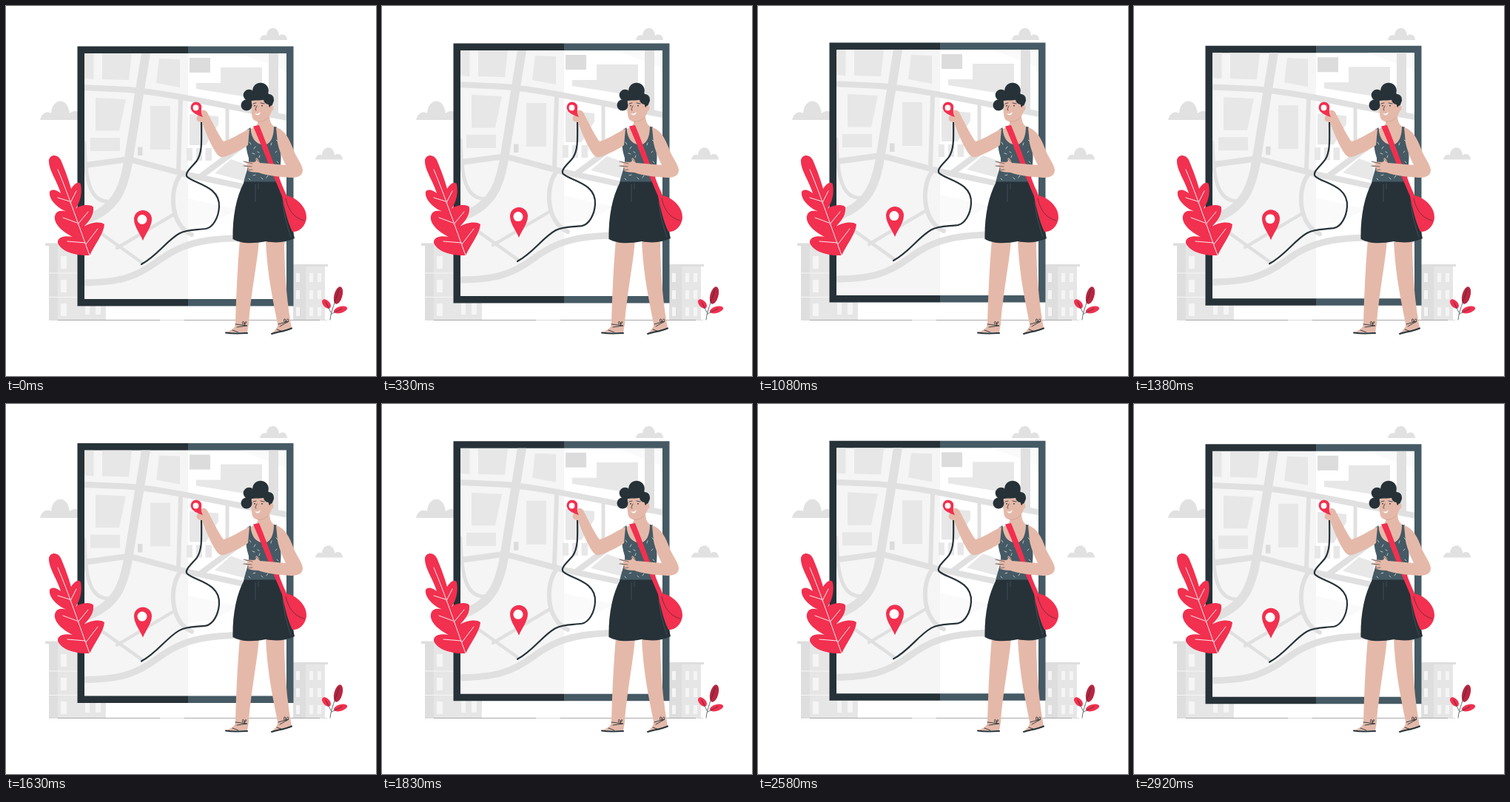
An HTML page that plays this animation: 500 px wide and 500 px high, repeating every 2.96 s.

```html
<!DOCTYPE html>
<html lang="en">
<head>
<meta charset="utf-8">
<title>Map guide</title>
<style>
  html, body { margin: 0; width: 100%; height: 100%; overflow: hidden; background: #fff; }
  svg { display: block; width: 100%; height: 100%; }
  .line { fill: none; stroke-linecap: round; stroke-linejoin: round; }
  .dark { fill: #263238; }
  .slate { fill: #455a64; }
  .red { fill: #f2304f; }
  .skin { fill: #e5b9a9; }
  .ink { stroke: #263238; }
</style>
</head>
<body>
<svg viewBox="0 0 500 500">
  <!-- clouds -->
  <g fill="#e1e1e1">
    <path id="cloud" d="M343 46C344 41 348 38 352 40C353 27 368 26 369 40C375 36 380 40 380 46Z"/>
    <use href="#cloud" x="75" y="161.500"/>
    <path d="M46 154C48 145 55 141 61 145C62 125 83 121 86 145C94 138 103 144 104 154Z"/>
  </g>

  <!-- buildings -->
  <g fill="#e6e6e6">
    <path fill="#dedede" d="M53 320.500H98V324H53ZM58 324H70V424H58Z"/>
    <path d="M70 324H98V400H135V424H70Z"/>
    <path fill="#f5f5f5" d="M74 338H82V355H74ZM74 370H82V387H74ZM74 402H82V419H74ZM107 401H113V417H107ZM121 401H128V417H121Z"/>
    <path stroke="#f5f5f5" d="M58 361H98M58 393.500H98"/>
    <path fill="#dedede" d="M386 349H435V352H386ZM388 352H405V424H388Z"/>
    <path d="M405 352H431V424H405Z"/>
    <path fill="#f5f5f5" d="M410 361H415V373H410ZM421 361H426V373H421ZM410 384H415V396H410ZM421 384H426V396H421ZM410 407H415V419H410ZM421 407H426V419H421ZM392 361H397V373H392ZM392 384H397V396H392ZM392 407H397V419H392Z"/>
  </g>
  <path stroke="#d2d2d2" stroke-width=".8" d="M58 424.500H434"/>
  <path stroke="#888" stroke-width=".6" d="M70 424.500H208M241 424.500H424"/>

  <!-- floating map -->
  <g id="map">
    <path class="dark" d="M96.500 54.500H246V405.500H96.500Z"/>
    <path class="slate" d="M246 54.500H388.500V405.500H246Z"/>
    <path fill="#f5f5f5" d="M106 64H246V396H106Z"/>
    <path fill="#fff" d="M246 64H379V396H246Z"/>
    <clipPath id="screen"><path d="M106 64H379V396H106Z"/></clipPath>
    <g clip-path="url(#screen)">
      <path fill="#fafafa" d="M246 260L313 275L280 293L246 298ZM316 64H379V88Z"/>
      <path fill="#e7e7e7" d="M106 64H118.500V99L106 98ZM130 64H170L166 100L130 99ZM207 71L235 72V110L203 104ZM121 124L162 126L153 168.500H121ZM114 178H154V196H114ZM195 135H222V194H195ZM257 104H290V83H346V126L257 112ZM248 146L287 149V160L270 188H248ZM244 192H252V209H244ZM257 192H265V209H257ZM269.500 192H278V209H269.500Z"/>
      <path fill="#dcdcdc" d="M248 70H276V90H248ZM178 190.500H184.500V202H178Z"/>
      <path fill="#e8e8e8" d="M282 226L304 207L324 214V237Z"/>
      <g class="line" stroke="#e0e0e0" stroke-width="6">
        <path stroke-width="8" d="M100 110L165 113C220 118 260 128 385 152M100 216L166 207L245 228L385 258M262 231L328 182"/>
        <path stroke-width="12" d="M190 58L166 205C160 245 150 277 100 291"/>
        <path stroke-width="5" d="M106 185C107 235 113 268 143 264M299 136V186"/>
        <path d="M236 128L233 222M236 228C221 245 220 295 251 309"/>
        <path stroke-width="4.500" d="M150 327L226 282M128 307L184 347"/>
        <path stroke-width="9" d="M100 374C153 374 175 367 205 345C238 321 270 307 385 317"/>
        <path stroke-width="13" stroke-linecap="butt" d="M361.500 64V146"/>
      </g>
    </g>
    <path class="line ink" stroke-width="2.200" d="M264 150C264 180 266 197 258 209C252 217 240 226 245 231C254 240 290 243 288 272C287 286 280 299 270 301C258 303 246 301 234 307.500C217 317 204 338 183 349"/>
    <path class="red" d="M185 317C181 307 173 298 173 288A12 12 0 0 1 197 288C197 298 189 307 185 317Z"/>
    <circle cx="184" cy="288.500" r="6.500" fill="#fff"/>
  </g>

  <!-- large leaf -->
  <path class="red" d="M113 337C97 338 75 333 70 320C69 311 82 310 90 312C80 307 64 296 66 284C68 275 77 276 83 278C74 276 57 263 59 251C62 246 69 249 74 253C70 238 57 221 58 208C60 200 70 200 74 208C80 222 85 236 88 247C92 240 99 236 101 241C103 252 101 264 94 274C100 269 115 267 118 272C119 282 113 291 104 299C112 293 127 290 133 295C132 308 120 322 113 337Z"/>
  <path class="line" stroke="#fff" stroke-width=".9" d="M70 221C84 254 99 299 113 337M86 264L70 259M87 266L95 250M96 293L77 286M97 295L111 278M107 320L83 318M108 322L124 301"/>

  <!-- small plant -->
  <ellipse cx="449" cy="391" rx="5.500" ry="12" fill="#ba2440" transform="rotate(15 449 391)"/>
  <ellipse class="red" cx="433" cy="402.500" rx="4.500" ry="7.500" transform="rotate(-42 433 402.500)"/>
  <ellipse class="red" cx="452" cy="410.500" rx="9.500" ry="4.300" transform="rotate(-16 452 410.500)"/>
  <path class="line ink" stroke-width=".7" d="M438 424C439 412 445 400 450 383M439 414L432 400M440 416L454 409"/>

  <!-- legs and sandals -->
  <g class="skin">
    <path d="M316 316H342C340 345 331 388 328 430L326 441H298C304 438 310 436 310 429C311 391 313 350 316 316Z"/>
    <path d="M351 316H376C376 354 379 392 384 424L386 435C378 438 368 442 359 443C363 438 368 435 367 429C361 398 353 364 351 316Z"/>
  </g>
  <g class="line ink">
    <path stroke-width="2" d="M297 441.500C307 443 317 442.500 326 442M359 443C368 440 376 440 386 435.500"/>
    <path stroke-width=".9" d="M310 430L326 432L312 434M306 438L314 441M320 430C318 425 322 425 322 430C324 424 327 427 322 431M368 430L382 426L370 433M366 437L374 440M376 427C374 421 379 422 378 427C380 420 385 424 379 428"/>
  </g>

  <!-- body -->
  <path class="skin" d="M328 167C337 164 341 162 341 151L356 146C356 160 361 163 369 166L367 198H330Z"/>
  <path class="slate" d="M326 167L330.500 164C331 179 338 187.500 349 187.500C358 187 362 176 362 163L366 163.500C366 176 372 190 371.500 205C371 220 369 230 369 239H321C324 225 329 215 328 205C325 195 323 187 326 167Z"/>
  <path class="line" stroke="#c9d2d5" stroke-width=".9" d="M329 184l2 3M337 190l-2 3M347 193l3 1M358 188l1-3M365 181l2 2M333 199l3 1M343 202l-1 3M354 201l2 3M366 196l-2 2M334 229l3-1M345 232l2 2M354 229l-2 3M364 233l2-2M328 233l2 2M340 197l2 1M366 210l2 2"/>
  <path class="dark" d="M322 237.500H370C378 260 384 287 390 314C378 319 367 321 351 318C335 321 319 322 306.500 315C306 285 311 258 322 237.500Z"/>
  <path class="line" stroke="#4d5b62" stroke-width=".7" d="M337 241V264M341 240V247M374 265C376 283 380 298 385 312"/>

  <!-- bag -->
  <path class="red" d="M334 162.500L342 161C354 190 365 224 379 256C393 259 407 272 406 287C404 300 394 306 387 305C382 295 377 278 373 257C359 226 348 194 334 162.500Z"/>
  <path class="line ink" stroke-width=".6" d="M378 260C382 278 391 287 403 290"/>

  <!-- arms -->
  <g class="skin">
    <path d="M329 166C318 171 303 181 294 183C288 176 278 155 272 144C269 140 264 140 262 144L258 150C256 155 261 157 265 157C270 172 280 195 287 202C291 206 296 204 300 202C312 197 322 192 327 188Z"/>
    <path d="M365 164C378 168 383 180 390 198C395 208 401 216 401 222C401 230 393 232 385 232C370 231 352 229 341 225C334 225 329 224 326 222L328 219L321 216L327 214L321 210L334 211C340 211 337 207 337 205C341 205 341 209 344 212L378 215C374 207 369 195 367 185Z"/>
  </g>
  <path class="line ink" stroke-width=".6" d="M321 210L333 213M321 216L332 217M326 222L333 221M337 205C339 208 341 210 344 212"/>

  <!-- held pin -->
  <path class="red" d="M266 150C260 148 250 145 249.500 137A7.500 7.500 0 0 1 264 134.500C265 140 262 143 266 150Z"/>
  <circle cx="256.500" cy="137.500" r="3.900" fill="#fff"/>
  <path class="skin" d="M264 142C268 139 271 142 273 146L270 150L265 147Z"/>

  <!-- head -->
  <path class="skin" d="M333 124C331 135 331 148 334 153C338 158 347 157 352 153C358 148 361 140 360 130L355 122L336 122Z"/>
  <g class="dark">
    <circle cx="325" cy="134" r="7.500"/>
    <circle cx="328.500" cy="120.500" r="7.800"/>
    <circle cx="344" cy="114.500" r="10.800"/>
    <circle cx="355" cy="126" r="7"/>
    <path d="M325 117L350 113L362 127C361 133 358 137 356 137C354 133 355 129 352 126C346 128 339 127 332 128L331 139L325 141Z"/>
  </g>
  <ellipse class="skin" cx="359" cy="138" rx="2.500" ry="3.500"/>
  <path class="line ink" stroke-width=".8" d="M334 132L338 131M344 131L349 132M339 135C337 139 336 141 338 141"/>
  <path class="line ink" stroke-width="1.500" d="M336 134.500V135M346 134.500V135"/>
  <path fill="#fff" d="M336 145C339 146 341 146 344 143C343 148 339 149 336 145Z"/>
  <path class="line" stroke="#ca9889" stroke-width=".7" d="M340 156C345 157 350 155 354 151"/>
</svg>
<script>
  const map = document.getElementById("map");
  const period = 1480, lift = 9;

  // Gentle ease: halfway between linear and smoothstep.
  const ease = u => (u + u * u * (3 - 2 * u)) / 2;

  function draw() {
    const turn = performance.now() / period % 1;
    const y = -lift * ease(1 - Math.abs(1 - 2 * turn));
    map.setAttribute("transform", `translate(0 ${y.toFixed(3)})`);
    requestAnimationFrame(draw);
  }
  draw();
</script>
</body>
</html>
```
